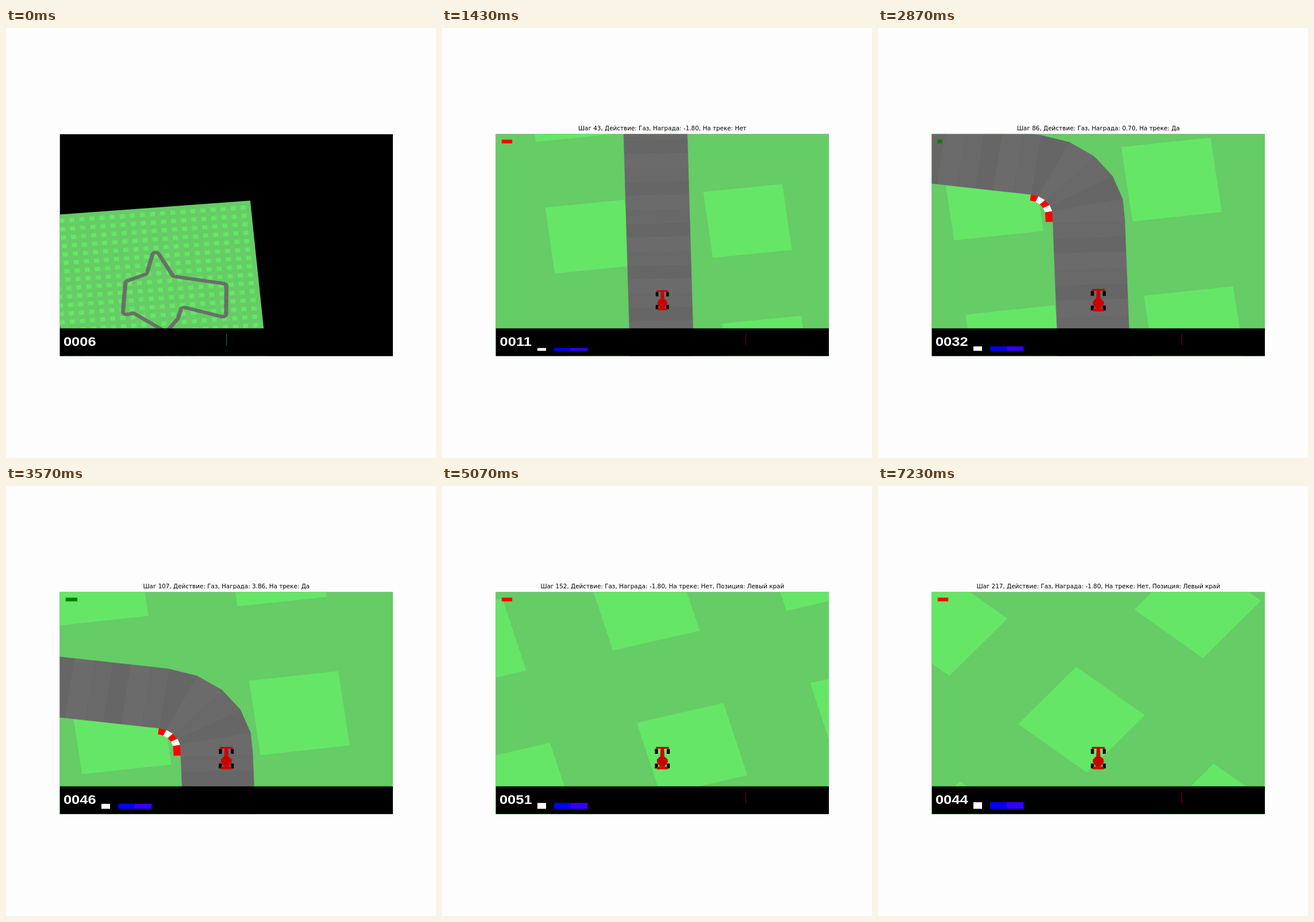
Write an HTML page with a canvas that moves like this. It is 748 by 748 pixels and loops after 7260 ms.

```html
<!DOCTYPE html>
<html lang="ru">
<head>
<meta charset="utf-8">
<style>
  html, body { margin: 0; width: 100%; height: 100%; overflow: hidden; background: #fdfdfd; }
  canvas { display: block; }
</style>
</head>
<body>
<canvas id="stage" width="748" height="748"></canvas>
<script>
const ctx = document.getElementById('stage').getContext('2d');
const LOOP = 7260, LAST = 217;
const FIELD = 1000 / 3, GRASS = FIELD / 20;
const RADIUS = 11.3, ROAD = 20 / 3, KERB = 4 / 3;
const TOP_SPEED = 1.28, SPEED_UP = 98;

// Corners of the circuit, starting on the right-hand straight
const corners = [
  [225.3, 1.1], [226.4, 12.3], [54.5, 57.8], [3.3, 176.4], [-31.3, 74.5], [-103.5, 51.2],
  [-124.6, -81.6], [-88.1, -75.6], [12.7, -159.7], [55, -111], [72.3, -64.6], [213.8, -120.5]
];

// Rounds the corners and samples the centre line at equal steps: [x, y, heading]
function buildTrack() {
  const at = i => corners[i % corners.length];
  const leg = i => [at(i + 1)[0] - at(i)[0], at(i + 1)[1] - at(i)[1]];
  const moves = [];
  let cut = 0;
  for (let i = 0; i < corners.length; i++) {
    const [ax, ay] = leg(i), [bx, by] = leg(i + 1);
    const turn = i < corners.length - 1 ? Math.atan2(ax * by - ay * bx, ax * bx + ay * by) : 0;
    const next = RADIUS * Math.tan(Math.abs(turn) / 2);
    moves.push([Math.hypot(ax, ay) - cut - next, 0], [RADIUS * Math.abs(turn), turn]);
    cut = next;
  }
  // The lap holds a whole number of three-tone tile groups
  const total = moves.reduce((sum, [length]) => sum + length, 0);
  const tiles = 3 * Math.round(total / 10.5), step = total / tiles;
  let [x, y] = corners[0], dist = 0;
  let dir = Math.atan2(leg(0)[1], leg(0)[0]);
  const points = [[x, y, dir]];
  for (const [length, turn] of moves) {
    const n = Math.round(length / 0.05);
    for (let k = 0; k < n; k++) {
      dir += turn / n / 2;
      x += Math.cos(dir) * length / n;
      y += Math.sin(dir) * length / n;
      dir += turn / n / 2;
      dist += length / n;
      if (dist >= points.length * step && points.length < tiles) points.push([x, y, dir]);
    }
  }
  return [...points, [...corners[0], dir]];
}
const track = buildTrack();

const speedAt = n => TOP_SPEED * (1 - Math.exp(-n / SPEED_UP));

// Slow drift to the right, then four ever stronger pulls on the wheel
function heading(n) {
  const drift = 0.0875 + 0.0415 * (1 - Math.exp(-n / 31));
  return [126, 171, 190, 203].reduce((a, middle, k) => {
    const u = Math.min(1, Math.max(0, (n - middle) / 9 + 0.5));
    return a + (0.14 + 0.03 * k) * u * u * (3 - 2 * u);
  }, drift);
}

// The car always moves the way it points
const path = [{ x: 220.4, y: -53.2 }];
for (let n = 0; n < LAST; n++) {
  const { x, y } = path[n], a = heading(n + 0.5), v = speedAt(n + 0.5);
  path.push({ x: x + v * Math.sin(a), y: y + v * Math.cos(a) });
}

const tilesAt = n => n < 1 ? 2 : Math.min(21, Math.floor(2.25 + (path[n].y + 55) / 3.47));

function poly(color, points, seam) {
  ctx.beginPath();
  points.forEach(p => ctx.lineTo(p[0], p[1]));
  ctx.closePath();
  ctx.fillStyle = color;
  ctx.fill();
  if (seam) {
    ctx.strokeStyle = color;
    ctx.lineWidth = seam;
    ctx.stroke();
  }
}

function rect(color, x, y, w, h) {
  ctx.fillStyle = color;
  ctx.fillRect(x, y, w, h);
}

function drawWorld() {
  rect('#66cc66', -FIELD, -FIELD, 2 * FIELD, 2 * FIELD);
  for (let i = -20; i < 20; i += 2)
    for (let j = -20; j < 20; j += 2) rect('#66e666', i * GRASS, j * GRASS, GRASS, GRASS);

  const side = ([x, y, h], d) => [x - Math.sin(h) * d, y + Math.cos(h) * d];
  for (let i = 0; i < track.length - 1; i++) {
    const a = track[i], b = track[i + 1], turn = b[2] - a[2];
    const band = (d, e) => [side(a, d), side(b, d), side(b, e), side(a, e)];
    const grey = 102 + 2.55 * ((i + 2) % 3);
    poly(`rgb(${grey},${grey},${grey})`, band(-ROAD, ROAD), 0.06);
    if (Math.abs(turn) > 0.002) {
      const s = Math.sign(turn);
      poly(i % 2 ? '#fff' : '#f00', band(s * ROAD, s * (ROAD + KERB)));
    }
  }
}

function drawCar(steer) {
  for (const x of [-55, 55])
    for (const y of [80, -82]) {
      ctx.save();
      ctx.translate(x, y);
      if (y > 0) ctx.rotate(-steer);
      rect('#000', -14, -27, 28, 54);
      ctx.restore();
    }
  const red = '#cc0000';
  rect(red, -60, 110, 120, 20);
  poly(red, [[-15, 120], [15, 120], [20, 20], [-20, 20]]);
  poly(red, [[25, 20], [50, -10], [50, -40], [20, -90], [-20, -90], [-50, -40], [-50, -10], [-25, 20]]);
  rect(red, -50, -120, 100, 30);
}

function drawPanel(n, spin) {
  rect('#000', 0, 700, 1000, 100);
  const height = 20 * speedAt(n);
  const up = (place, count, color) => rect(color, place * 25, 780 - height, count * 25 + 1, height + 1);
  const across = (place, value, color) => rect(color, place * 25, 720, 1 + value * 25, 41);
  if (n > 0) {
    up(5, 1, '#fff');
    up(7, 2, '#00f');
    up(9, 2, '#3300ff');
  }
  const turning = spin > 0.002;
  if (turning || n < 2) across(20, spin * 36, '#0f0');
  if (turning || (n > 0 && (n < 96 || n > 110))) across(30, spin * 42, '#f00');

  const score = Math.floor(tilesAt(n) * 3.1646 - 0.1 * (n + 1));
  ctx.fillStyle = '#fff';
  ctx.font = 'bold 44px "Liberation Sans", Arial, sans-serif';
  ctx.textAlign = 'center';
  ctx.fillText(String(score).padStart(4, '0'), 60, 764);
}

function drawCaption(n, zooming) {
  const lost = path[n].y > 12, onTrack = !zooming && !lost;
  const reward = (onTrack ? 0.7 : -1.8) + (tilesAt(n) > tilesAt(n - 1) ? 3.16 : 0);
  rect(reward < 0 ? '#f00' : '#008000', 103.8, 194.2,
    0.966 * (Math.min(20, Math.abs(reward) * 10) + 1), 6.5);
  ctx.fillStyle = '#000';
  ctx.font = '10.4px "DejaVu Sans", sans-serif';
  ctx.textAlign = 'center';
  ctx.fillText(`Шаг ${n}, Действие: Газ, Награда: ${reward.toFixed(2)}, На треке: ${onTrack ? 'Да' : 'Нет'}`
    + (lost ? ', Позиция: Левый край' : ''), 383.3, 178);
}

function draw(n) {
  const spin = n > 107 ? heading(n + 0.5) - heading(n - 0.5) : 0;
  const life = Math.min(1, (n + 1) / 50), zoom = 0.6 * (1 - life) + 16.2 * life;

  ctx.setTransform(1, 0, 0, 1, 0, 0);
  rect('#fdfdfd', 0, 0, 748, 748);
  ctx.save();
  ctx.setTransform(0.5795, 0, 0, 0.4828, 93.5, 184.5);
  ctx.beginPath();
  ctx.rect(0, 0, 1000, 800);
  ctx.clip();
  rect('#000', 0, 0, 1000, 800);

  ctx.save();
  ctx.translate(500, 600);
  ctx.scale(zoom, -zoom);
  ctx.save();
  ctx.rotate(heading(n));
  ctx.translate(-path[n].x, -path[n].y);
  drawWorld();
  ctx.restore();
  ctx.scale(0.02, 0.02);
  drawCar(spin * 3.4);
  ctx.restore();

  drawPanel(n, spin);
  ctx.restore();
  if (n > 0) drawCaption(n, life < 1);
}

function tick() {
  const ticks = Math.floor(performance.now() % LOOP / 10);
  draw(Math.min(LAST, Math.floor((ticks + 0.5) * 0.3)));
  requestAnimationFrame(tick);
}
tick();
</script>
</body>
</html>
```
